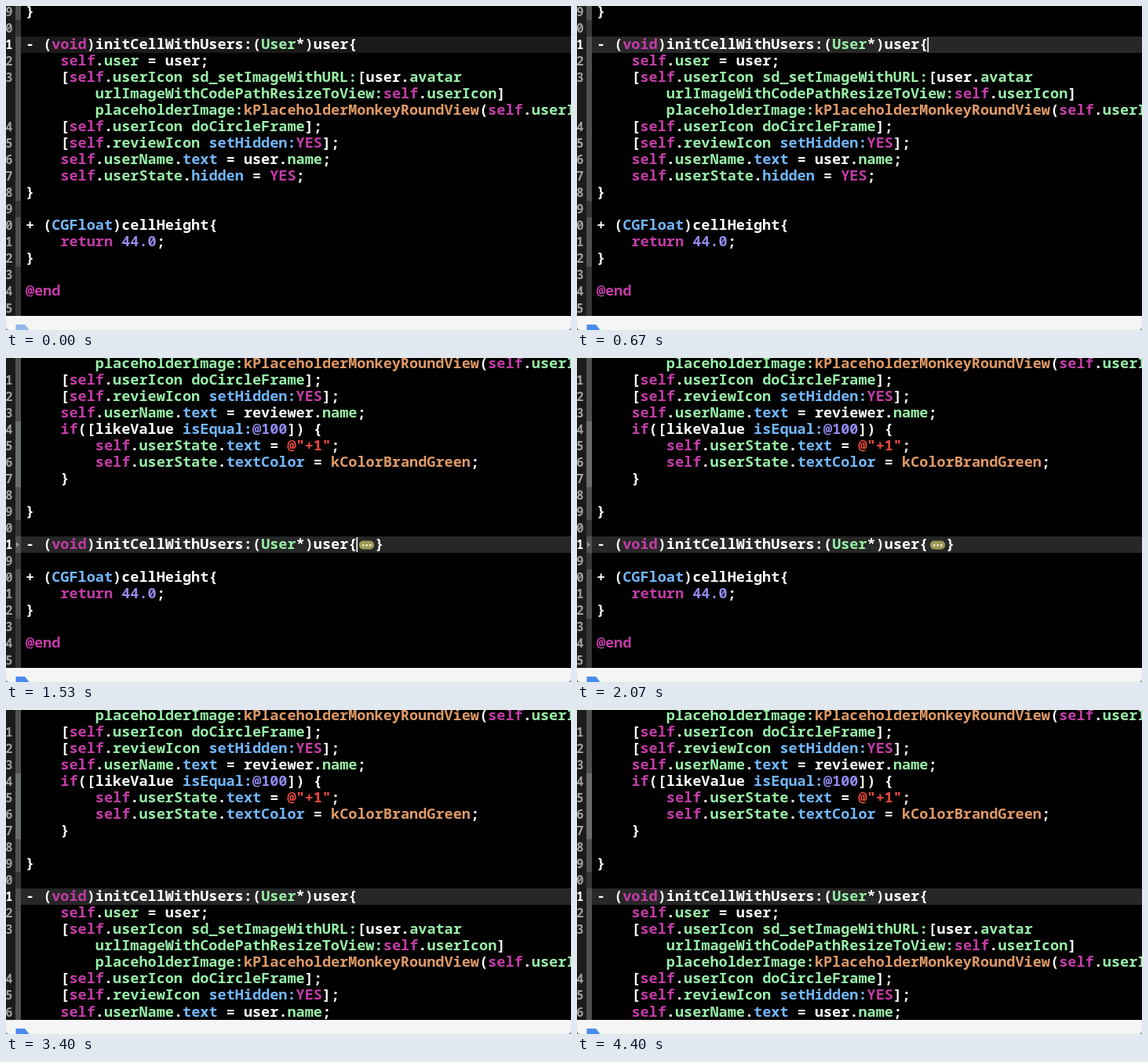
These frames come from a looping animation (720x414 px, 4470 ms). An HTML page with a canvas:

```html
<!DOCTYPE html>
<html lang="en">
<head>
<meta charset="utf-8">
<title>Code folding</title>
<style>
  html, body { margin: 0; height: 100%; overflow: hidden; background: #000; }
  canvas { display: block; }
</style>
</head>
<body>
<canvas id="stage" width="720" height="414"></canvas>
<script>
const ctx = document.getElementById('stage').getContext('2d');
const LOOP = 4470, FOLD = 1530, UNFOLD = 2530;
const ROW = 21.05, TOP = -3.4, LEFT = 24.9, CHAR = 11.12;
const SIGNATURE = 11, BODY_END = 20;

// Each line starts with the visible digit of its number, or a space for a wrapped line.
const code = `
         placeholderImage:kPlaceholderMonkeyRoundView(self.userIcon)];
1    [self.userIcon doCircleFrame];
2    [self.reviewIcon setHidden:YES];
3    self.userName.text = reviewer.name;
4    if([likeValue isEqual:@100]) {
5        self.userState.text = @"+1";
6        self.userState.textColor = kColorBrandGreen;
7    }
8
9}
0
1- (void)initCellWithUsers:(User*)user{
2    self.user = user;
3    [self.userIcon sd_setImageWithURL:[user.avatar
         urlImageWithCodePathResizeToView:self.userIcon]
         placeholderImage:kPlaceholderMonkeyRoundView(self.userIcon)];
4    [self.userIcon doCircleFrame];
5    [self.reviewIcon setHidden:YES];
6    self.userName.text = user.name;
7    self.userState.hidden = YES;
8}
9
0+ (CGFloat)cellHeight{
1    return 44.0;
2}
3
4@end
5`.slice(1).split('\n');

const rules = [
  [/^@"/, '#ee4a40'],
  [/^@?\d/, '#938aee'],
  [/^(self|void|YES|return|if|@end)$/, '#c43ca8'],
  [/^k[A-Z]/, '#e09a66'],
  [/^(setHidden:|isEqual:|text|textColor|hidden|CGFloat)$/, '#72b8ff'],
  [/^(User|doCircleFrame|sd_\w+:|urlImage\w+:|placeholderImage:)$/, '#98f0a8'],
];

function colorOf(word, previous) {
  const rule = rules.find(([pattern]) => pattern.test(word));
  if (rule) return rule[1];
  return previous === '.' && /^\w/.test(word) ? '#98f0a8' : '#fff';
}

const tokens = code.map(line => {
  const text = line.slice(1);
  return [...text.matchAll(/@"[^"]*"|@?\d[\d.]*|@?\w+:?|[^\s\w]/g)].map(m => ({
    word: m[0], x: LEFT + m.index * CHAR, color: colorOf(m[0], text[m.index - 1]),
  }));
});

function rect(color, x, y, w, h) {
  ctx.fillStyle = color;
  ctx.fillRect(x, y, w, h);
}

function shape(color, points) {
  ctx.fillStyle = color;
  ctx.beginPath();
  points.forEach(([x, y]) => ctx.lineTo(x, y));
  ctx.fill();
}

function write(text, x, y, color, align = 'left') {
  ctx.fillStyle = color;
  ctx.textAlign = align;
  ctx.fillText(text, x, y);
}

function ribbonColor(line) {
  if (line >= 4 && line <= 7) return '#6a6e6a';
  return line < 10 || (line >= 11 && line <= 20) || (line >= 22 && line <= 24) ? '#505050' : '#363636';
}

function drawFold(y) {
  ctx.fillStyle = '#9c9a58';
  ctx.beginPath();
  ctx.roundRect(450, y + 5.5, 19, 11, 5);
  ctx.fill();
  for (const x of [455, 459.5, 464]) rect('#f6e8c4', x - 1, y + 10, 2.4, 2.4);
  write('}', 470.2, y + 16, '#fff');
  shape('#999', [[13, y + 7], [17, y + 10.5], [13, y + 14]]);
}

function drawLine(line, top, folded, time) {
  const y = Math.round(top);
  const current = line === SIGNATURE;
  if (current) {
    const level = 26 + 13 * Math.min(1, (time < UNFOLD ? time : time - UNFOLD) / 400);
    rect(`rgb(${level} ${level} ${level})`, 19, y, 701, 21);
  }
  rect(ribbonColor(line), 12, y, 7, 22);

  ctx.font = '600 15.5px "Noto Sans Mono", monospace';
  write(code[line][0], 8.5, y + 16, current ? '#fff' : '#a0a0a0', 'right');
  ctx.font = '600 18.53px "Noto Sans Mono", monospace';
  for (const { word, x, color } of tokens[line]) write(word, x, y + 16, color);

  if (!current) return;
  if (folded) drawFold(y);
  if ((time + 550) % 1000 < 500) rect('#fff', 446.5, y + 1, 1.6, 19);
}

function draw(time) {
  const folded = time >= FOLD && time < UNFOLD;
  rect('#000', 0, 0, 720, 414);
  rect('#1b1b1b', 0, 0, 12, 396);

  let y = TOP - (time < FOLD ? 9 * ROW : 0);
  code.forEach((_, line) => {
    if (folded && line > SIGNATURE && line <= BODY_END) return;
    if (y > -ROW && y < 396) drawLine(line, y, folded, time);
    y += ROW;
  });

  rect('#f5f5f5', 0, 396, 720, 18);
  shape(time < 70 ? '#8fb8ee' : '#4a8af0', [[12.5, 407], [24, 407], [29.5, 414], [12.5, 414]]);
  shape('#777', [[0, 410], [1, 413], [4, 414], [0, 414]]);
  shape('#777', [[720, 410], [719, 413], [716, 414], [720, 414]]);
}

function tick() {
  draw(performance.now() % LOOP);
  requestAnimationFrame(tick);
}
tick();
</script>
</body>
</html>
```
